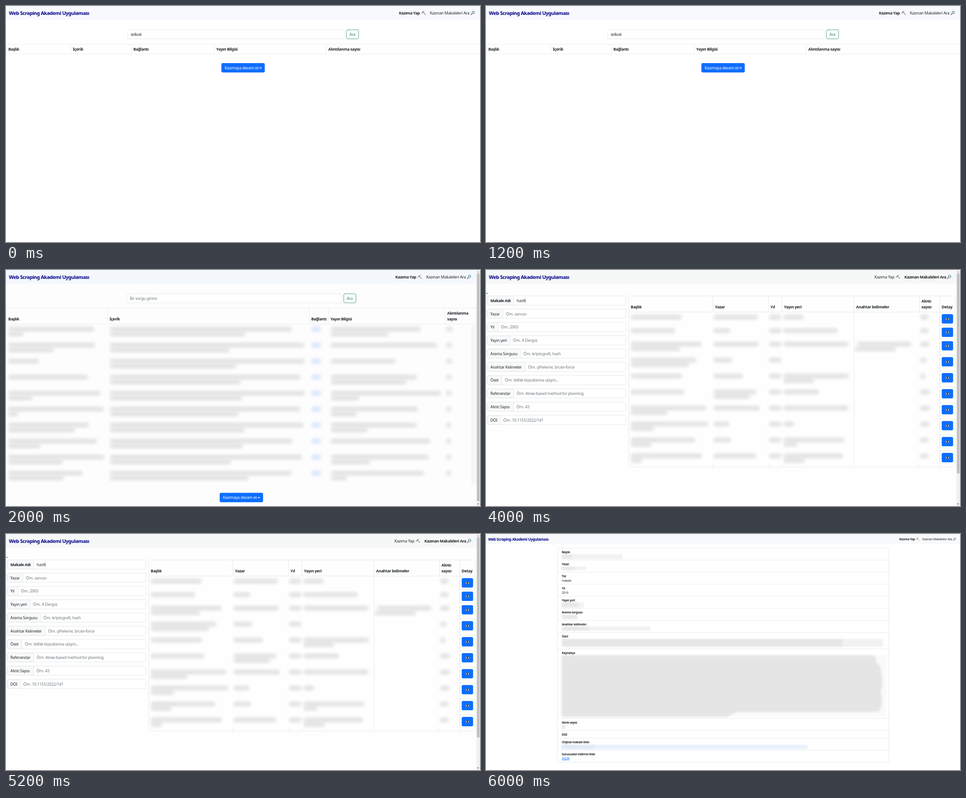
An HTML page for the animation above (8000 ms loop, 1058 by 529 pixels).

```html
<!DOCTYPE html>
<html lang="tr">
<head>
<meta charset="utf-8">
<title>Web Scraping Akademi Uygulaması</title>
<style>
html, body { margin: 0; width: 100%; height: 100%; overflow: hidden; background: #fff; }
svg { display: block; width: 100%; height: 100%; }
text { font-family: "Noto Sans", "Open Sans", sans-serif; font-size: 8.8px; letter-spacing: -.029em; fill: #212529; white-space: pre; }
.b { font-weight: 700; letter-spacing: -.043em; }
.brand { font-size: 11px; fill: #00008b; }
.small text { font-size: 6.6px; }
.small .brand { font-size: 8.25px; }
.hint { fill: #6c757d; }
.green { fill: #198754; }
.white { fill: #fff; }
.link { fill: #0d6efd; text-decoration: underline; }
</style>
</head>
<body>
<svg id="stage" viewBox="0 0 1058 529" xmlns="http://www.w3.org/2000/svg">
  <defs>
    <filter id="halo" filterUnits="userSpaceOnUse" x="-20" y="0" width="1100" height="529"><feGaussianBlur stdDeviation="2"/></filter>
    <filter id="core" filterUnits="userSpaceOnUse" x="-20" y="0" width="1100" height="529"><feGaussianBlur stdDeviation="3.2"/></filter>
    <filter id="soft" filterUnits="userSpaceOnUse" x="0" y="0" width="1058" height="529"><feGaussianBlur stdDeviation="1"/></filter>
    <symbol id="pick" viewBox="0 0 10 10">
      <path d="M4 3.5L9 9" stroke="#a5673f" stroke-width="1.3" stroke-linecap="round"/>
      <path d="M.8 6.6C1 4 3.4 1.4 7 1.1C4.8 2.2 2.6 4 .8 6.6Z" fill="#6b7f88" stroke="#5d7079" stroke-width=".6"/>
    </symbol>
    <symbol id="lens" viewBox="0 0 10 10">
      <path d="M.9 9.1L3.6 6.4" stroke="#4a5358" stroke-width="1.5" stroke-linecap="round"/>
      <circle cx="6.1" cy="3.9" r="3" fill="#b5e2f5" stroke="#6d7f88" stroke-width="1"/>
    </symbol>
    <symbol id="eye" viewBox="0 0 10 10">
      <path d="M.4 5.2Q5 -.2 9.6 5.2Q5 10 .4 5.2Z" fill="#f5f5f5" stroke="#3b3b3b" stroke-width=".7"/>
      <circle cx="5" cy="4.9" r="2" fill="#6d4434"/>
      <circle cx="5" cy="4.9" r="1" fill="#1c1c1c"/>
    </symbol>
  </defs>
</svg>
<script>
const SCENE_MS = 2000;
const LINE = '#dee2e6', BLUE = '#0d6efd', GREEN = '#198754';
const stage = document.getElementById('stage');

const text = (x, y, s, cls = '') => `<text x="${x}" y="${y}" class="${cls}">${s}</text>`;
const rect = (x, y, w, h, fill, extra = '') => `<rect x="${x}" y="${y}" width="${w}" height="${h}" fill="${fill}" ${extra}/>`;
const frame = (x, y, w, h, stroke = LINE, fill = '#fff') =>
  rect(x, y, w, h, fill, `rx="3" stroke="${stroke}" stroke-width=".8"`);
const path = (d, stroke = LINE, width = .7) => `<path d="${d}" fill="none" stroke="${stroke}" stroke-width="${width}"/>`;
const hline = (x1, x2, y) => path(`M${x1} ${y}H${x2}`);
const vline = (x, y1, y2) => path(`M${x} ${y1}V${y2}`);
const icon = (id, x, y, size) => `<use href="#${id}" x="${x}" y="${y}" width="${size}" height="${size}"/>`;
const repeat = (n, fn) => Array.from({ length: n }, (_, i) => fn(i)).join('');

function navbar(bg, xs, active, k = 1) {
  const h = 30.7 * k, mid = h / 2;
  const cls = i => active === i ? 'b' : '';
  const base = mid + 3.4 * k, size = 10 * k;
  return rect(0, 0, 1058, h, bg)
    + text(6.6 * k, mid + 4.3 * k, 'Web Scraping Akademi Uygulaması', 'b brand')
    + text(xs[0], base, 'Kazıma Yap', cls(0)) + icon('pick', xs[1], mid - 5 * k, size)
    + text(xs[2], base, 'Kazınan Makaleleri Ara', cls(1)) + icon('lens', xs[3], mid - 5 * k, size);
}

function searchBar(x, width, value, cls) {
  const end = x + width;
  return frame(x, 53.3, width, 20.4) + text(x + 7.2, 66.8, value, cls)
    + frame(end + 5, 53.3, 27, 20.4, GREEN) + text(end + 11.6, 66.8, 'Ara', 'green');
}

function continueButton(x, y) {
  const ay = y + 10.8, ax = x + 84.3;
  return rect(x, y, 96.8, 21, BLUE, 'rx="3.2"') + text(x + 7.2, y + 13.9, 'Kazımaya devam et', 'white')
    + path(`M${ax} ${ay}h3.6`, '#fff', 1.1)
    + `<path d="M${ax + 2.8} ${ay - 1.9}l2.9 1.9l-2.9 1.9z" fill="#fff"/>`;
}

function scrollbar(end) {
  return rect(1050, 0, 8, 529, '#f1f1f1') + rect(1051, 8, 6, end - 8, '#c1c1c1')
    + '<path d="M1052 5.4l2-2.4l2 2.4z" fill="#8a8a8a"/><path d="M1052 523.6l2 2.4l2-2.4z" fill="#505050"/>';
}

// Smears: [x1, x2, y, tint]; x1 and x2 are the outer edges of the haze.
function smears(list) {
  const strokes = (inset, width, pick) => list.map(([a, b, y, tint]) =>
    `<path d="M${a + inset} ${y}H${Math.max(b - inset, a + inset + .5)}" stroke="${pick(tint)}" stroke-width="${width}" stroke-linecap="round"/>`).join('');
  return `<g filter="url(#halo)">${strokes(8, 15, t => t ? '#eff4fd' : '#f5f5f5')}</g>`
    + `<g filter="url(#core)">${strokes(9, 8, t => t ? '#dbe7fd' : '#e2e2e2')}</g>`;
}

// Each cell is [first line end, second line end].
function column(start, cells, yOf, gap) {
  return cells.flatMap((ends, i) => [].concat(ends)
    .map((end, k) => end && [start, end, yOf(i) + k * gap]).filter(Boolean));
}

function emptyScene() {
  const xs = [.4, 144.5, 279.5, 464.5, 714.5];
  const heads = ['Başlık', 'İçerik', 'Bağlantı', 'Yayın Bilgisi', 'Alıntılanma sayısı'];
  return navbar('#f8f9fd', [877, 927, 946, 1037], 0)
    + searchBar(271.5, 483.5, 'telbok')
    + hline(0, 1058, 85.4) + hline(0, 1058, 107.6)
    + heads.map((h, i) => vline(xs[i], 85.4, 107.6) + text(xs[i] + 4.8, 100, h, 'b')).join('')
    + continueButton(480.8, 128);
}

function resultScene() {
  const xs = [.4, 226.5, 676.5, 719.5, 980];
  const heads = ['Başlık', 'İçerik', 'Bağlantı', 'Yayın Bilgisi', 'sayısı'];
  const pitch = 35.85, yOf = i => 132.5 + i * pitch;
  const titles = [[200, 42], [202, 110], 77, 186, [214, 62], [221, 30], [188, 157], [206, 80], [223, 130], [174, 132]];
  const bodies = [[641, 537], [669, 502], [670, 517], [661, 527], [670, 530], [660, 522], [667, 536], [642, 532], [664, 506], [641, 544]];
  const places = [[929, 857], 965, 873, [920, 897], [974, 792], [922, 786], [920, 810], 950, [947, 816], [936, 764]];
  const counts = [1000, 999, 999, 998, 998, 995, 995, 994, 994, 994];
  const list = [
    ...column(2, titles, yOf, 11), ...column(229, bodies, yOf, 11),
    ...column(722, places, yOf, 11), ...column(979, counts, yOf, 11),
    ...counts.map((_, i) => [679, 706, yOf(i), 1])
  ];
  return rect(0, 0, 1058, 529, '#fdfdfd')
    + navbar('#f4f8fc', [869, 918.5, 938, 1028.6], 0)
    + searchBar(269, 480, 'Bir sorgu giriniz', 'hint')
    + smears(list)
    + rect(1039, 122, 8, 358, '#f4f4f4', 'filter="url(#halo)"')
    + hline(0, 1050, 85.4) + hline(0, 1050, 121.2)
    + heads.map((h, i) => vline(xs[i], 85.4, 121.2) + text(xs[i] + 4.7, 113.2, h, 'b')).join('')
    + text(984.7, 100, 'Alıntılanma', 'b')
    + vline(1049.6, 85.4, 480)
    + repeat(10, i => hline(1047, 1050, 157 + i * pitch))
    + continueButton(477, 499.4)
    + scrollbar(518);
}

function filterForm() {
  const fields = [
    ['Makale Adı', 62, 'hash'], ['Yazar', 38, 'Örn. sarvun'], ['Yıl', 27, 'Örn. 2003'],
    ['Yayın yeri', 54, 'Örn. A Dergisi'], ['Arama Sorgusu', 77, 'Örn. kriptografi, hash'],
    ['Anahtar Kelimeler', 87.5, 'Örn. şifreleme, brute-force'], ['Özet', 35.5, 'Örn. ittifak boyutlarına ulaşm...'],
    ['Referanslar', 62, 'Örn. Atree-based method for planning'], ['Alıntı Sayısı', 61.5, 'Örn. 43'], ['DOI', 32, 'Örn. 10.1155/2022/141']
  ];
  return fields.map(([label, end, value], i) => {
    const y = 58.2 + i * 29.75;
    return frame(3, y, 309.4, 20.4)
      + `<path d="M${end} ${y}H6a3 3 0 0 0-3 3v14.4a3 3 0 0 0 3 3H${end}z" fill="#f8f9fa" stroke="${LINE}" stroke-width=".8"/>`
      + text(9.8, y + 13.6, label, i ? '' : 'b') + text(end + 6.6, y + 13.6, value, i ? 'hint' : '');
  }).join('') + path('M87.2 64V73', '#212529', .8);
}

function searchScene() {
  const xs = [318.5, 506.5, 630.5, 660.5, 821.5, 967.5, 1012.5, 1047.5];
  const heads = ['Başlık', 'Yazar', 'Yıl', 'Yayın yeri', 'Anahtar kelimeler', 'sayısı', 'Detay'];
  const top = i => i < 2 ? 94.2 + i * 30.2 : 154.6 + (i - 2) * 35.8;
  const yOf = i => top(i) + 11.6;
  const titles = [440, 425, [484, 436], [472, 456], 441, 446, [494, 408], [499, 378], [470, 372], [485, 352]];
  const authors = [610, 548, 611, 552, 576, [606, 592], 614, 546, 550, 606];
  const places = [712, 788, 812, 0, [813, 735], 746, 811, 691, [802, 698], [800, 715]];
  const counts = [991, 991, 993, 986, 984, 994, 994, 993, 991, 991];
  const list = [
    ...column(320, titles, yOf, 10), ...column(505, authors, yOf, 10),
    ...column(629, counts.map(() => 662), yOf, 10), ...column(661, places, yOf, 10),
    ...column(966, counts, yOf, 10),
    [826, 952, 166.5], [821, 918, 177]
  ];
  return rect(0, 0, 1058, 529, '#fdfefd')
    + navbar('#f6f8f8', [867, 914.5, 934, 1028.8], 1)
    + path('M0 52.4H4.4', '#333', .9)
    + filterForm()
    + smears(list)
    + rect(318.5, 58.2, 729, 36, '#fdfefd')
    + [58.2, 94.2, 441].map(y => hline(318.5, 1047.5, y)).join('')
    + xs.map((x, i) => [0, 4, 6, 7].includes(i)
      ? vline(x, 58.2, 441) : vline(x, 58.2, 94.2) + vline(x, 435, 441)).join('')
    + heads.map((h, i) => text(xs[i] + 4.6, 86.2, h, 'b')).join('')
    + text(972.1, 73, 'Alıntı', 'b')
    + repeat(10, i => (i ? hline(1000, 1047.5, top(i)) : '')
      + rect(1017.2, top(i) + 4.9, 25.4, 20.8, BLUE, 'rx="3.2"') + icon('eye', 1025, top(i) + 10.5, 9.8))
    + scrollbar(456);
}

// A pale strip whose left part is darker.
function strip(x, y, w, h, dark, pale = '#f2f2f2', deep = '#e6e6e6') {
  return rect(x, y, w, h, pale, 'filter="url(#soft)"')
    + rect(x + 2, y + 1, dark, h - 2, deep, 'filter="url(#halo)"');
}

function detailScene() {
  const rows = [
    ['Başlık', 31.5], ['Yazar', 58.5], ['Tür', 85.5, 'makale'], ['Yıl', 112.5, '2016'], ['Yayın yeri', 139.5],
    ['Arama sorgusu', 166.5], ['Anahtar kelimeler', 193.5], ['Özet', 220.5], ['Kaynakça', 257.5],
    ['Alıntı sayısı', 413.5], ['DOI', 440.5], ['Orijinal makale linki', 457.5], ['Sunucudan indirme linki', 484.5, 'İNDİR', 'link']
  ];
  const refs = 'M169 272H864Q872 276 871 288Q884 296 882 312Q888 332 881 352Q888 374 879 396Q872 399 858 399H560Q548 403 540 409.5H169Z';
  return navbar('#f8f9fa', [922.5, 959.7, 974, 1042], 0, .75)
    + frame(159.3, 31.5, 740.2, 480)
    + strip(168, 45.5, 137, 10.5, 22) + strip(168, 73, 56, 8, 28)
    + strip(168, 153, 50, 11.5, 36) + strip(169, 181, 35, 9.5, 32)
    + strip(169, 207.3, 198, 9.4, 60) + strip(169, 235, 717, 18, 624)
    + rect(169, 272, 725, 137.5, '#fafafa', 'filter="url(#halo)"')
    + `<path d="${refs}" fill="#e5e5e5" filter="url(#halo)"/>`
    + strip(169, 428, 8, 9, 4, '#ededed') + strip(168, 472.3, 550, 10, 72, '#eaf1fd', '#e1e9f5')
    + rows.map(([label, y, value, cls], i) => (i ? hline(159.3, 899.5, y) : '')
      + text(169.2, y + 11.1, label, 'b') + (value ? text(169.2, y + 21.1, value, cls) : '')).join('');
}

const scenes = [emptyScene, resultScene, searchScene, detailScene].map((build, i) => {
  const g = document.createElementNS('http://www.w3.org/2000/svg', 'g');
  g.innerHTML = build();
  if (i === 3) g.setAttribute('class', 'small');
  stage.append(g);
  return g;
});

function draw(ms) {
  const current = Math.floor(ms / SCENE_MS) % scenes.length;
  scenes.forEach((g, i) => { g.style.display = i === current ? '' : 'none'; });
}

function tick() {
  draw(performance.now());
  requestAnimationFrame(tick);
}
tick();
</script>
</body>
</html>
```
